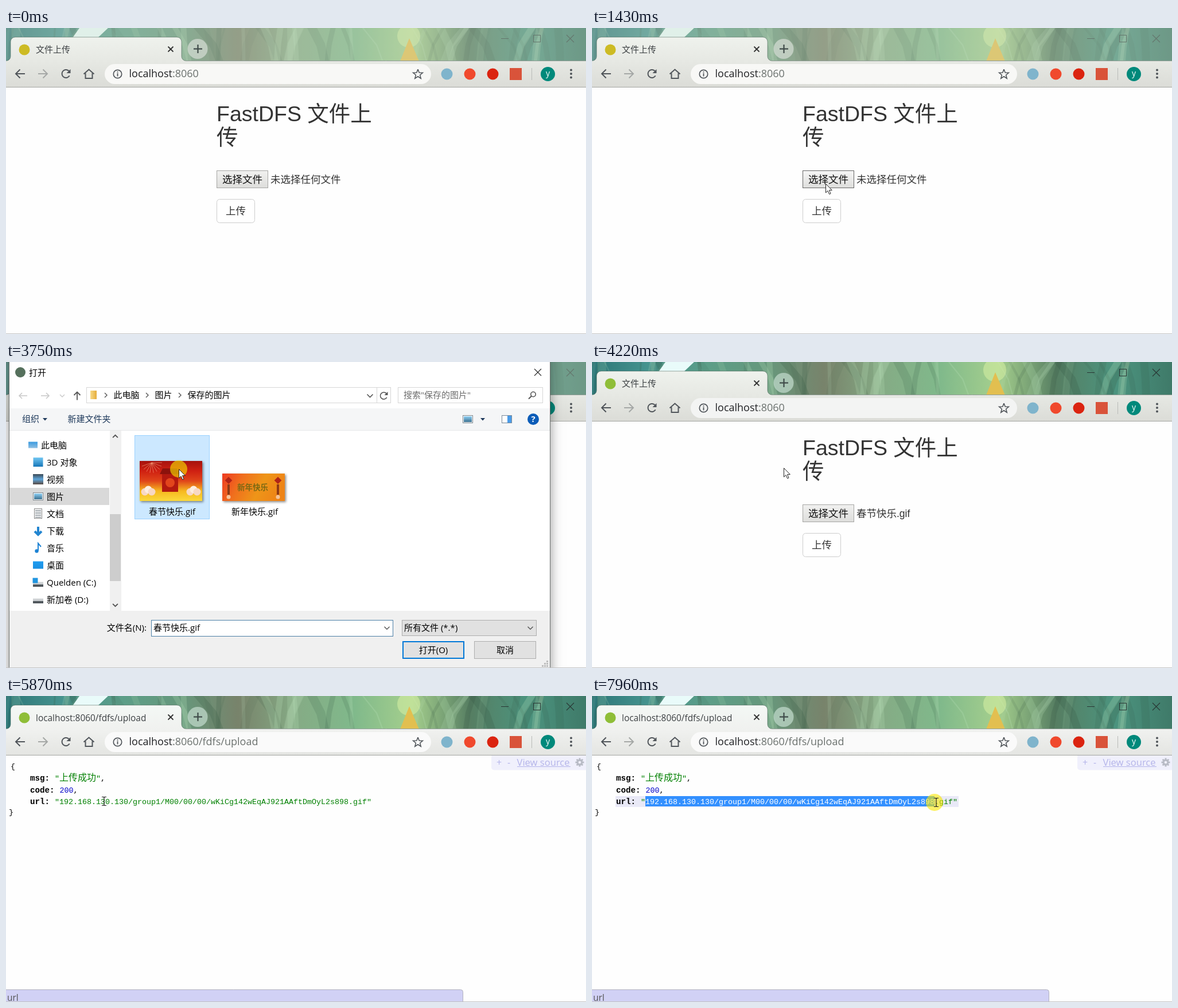
Write an HTML page with a canvas that moves like this. It is 1011 by 535 pixels and loops after 8000 ms.

```html
<!DOCTYPE html>
<html lang="zh-CN">
<head>
<meta charset="utf-8">
<title>文件上传</title>
<style>
html, body { margin: 0; width: 100%; height: 100%; overflow: hidden; background: #fff; }
canvas { display: block; }
</style>
</head>
<body>
<canvas id="stage" width="1011" height="535"></canvas>
<script>
const W = 1011, H = 535, LOOP = 8000, STEP = 75;
const g = document.getElementById('stage').getContext('2d');
const CJK = '"Noto Sans CJK SC", "Noto Sans CJK", sans-serif';
const UI = '"Open Sans", ' + CJK;
const PAGE = '"Liberation Sans", ' + CJK;
const MONO = '"Liberation Mono", "Noto Sans CJK SC", monospace';

// Scene times in ms
const AT = {
  focus: 1030, blur: 1430, open: 2040, shown: 2280, scroll: 2520, list: 2660, full: 2820,
  caret: 3200, pick: 3600, closing: 3830, closed: 3980,
  send: 4930, address: 5080, json: 5240, panel: 5320, hover: 5870, press: 7030, drag: 7180
};
const between = (t, a, b) => t >= a && t < b;

// ---- drawing helpers ----
function text(s, x, cy, size, color = '#000', font = UI, align = 'left', weight = '') {
  g.font = `${weight} ${size}px ${font}`;
  g.textAlign = align;
  g.fillStyle = color;
  g.fillText(s, x, cy + size * 0.36);
  return x + g.measureText(s).width;
}
function rect(x, y, w, h, fill, border, lw = 1) {
  if (fill) { g.fillStyle = fill; g.fillRect(x, y, w, h); }
  if (border) {
    g.strokeStyle = border;
    g.lineWidth = lw;
    g.strokeRect(x + lw / 2, y + lw / 2, w - lw, h - lw);
  }
}
function round(x, y, w, h, r, fill, border) {
  g.beginPath();
  g.roundRect(x, y, w, h, r);
  g.fillStyle = fill;
  g.fill();
  if (border) { g.strokeStyle = border; g.lineWidth = 1; g.stroke(); }
}
function disc(x, y, r, fill) {
  g.beginPath();
  g.arc(x, y, r, 0, Math.PI * 2);
  g.fillStyle = fill;
  g.fill();
}
function ring(x, y, r, color, w, from = 0, to = 7) {
  g.beginPath();
  g.arc(x, y, r, from, to);
  g.strokeStyle = color;
  g.lineWidth = w;
  g.stroke();
}
function trace(p) {
  g.beginPath();
  for (let i = 0; i < p.length; i += 2) g.lineTo(p[i], p[i + 1]);
}
function poly(fill, ...p) { trace(p); g.fillStyle = fill; g.fill(); }
function line(color, w, ...p) { trace(p); g.strokeStyle = color; g.lineWidth = w; g.stroke(); }
function cross(x, y, r, color, w) {
  line(color, w, x - r, y - r, x + r, y + r);
  line(color, w, x + r, y - r, x - r, y + r);
}
function rays(x, y, r, n, from, to, color, w) {
  for (let i = 0; i < n; i++) {
    const a = from + (to - from) * i / n;
    line(color, w, x, y, x + r * Math.cos(a), y + r * Math.sin(a));
  }
}
function turned(x, y, angle, paint) {
  g.save();
  g.translate(x, y);
  g.rotate(angle);
  paint();
  g.restore();
}
// Angle 0 points right
function arrow(x, y, angle, r, head, color, w = 2) {
  turned(x, y, angle, () => {
    line(color, w, -r, 0, r, 0);
    line(color, w, r - head, -head, r, 0, r - head, head);
  });
}
function chevron(x, y, angle, r = 4, color = '#555', w = 1.4) {
  turned(x, y, angle, () => line(color, w, -r / 2, -r, r / 2, 0, -r / 2, r));
}
function reload(x, y, r, color, w) {
  ring(x, y, r, color, w, .5, 5.5);
  poly(color, x + r + 1, y - r - 1, x + r + 1, y - 1, x + 1, y - 1);
}
const DOWN = Math.PI / 2, UP = -DOWN, LEFT = Math.PI;
function triangle(x, y, color) { poly(color, x - 4, y - 2, x + 4, y - 2, x, y + 2.5); }
function fade(x0, y0, x1, y1, ...colors) {
  const f = g.createLinearGradient(x0, y0, x1, y1);
  colors.forEach((c, i) => f.addColorStop(i / (colors.length - 1), c));
  return f;
}
function seeded(s) {
  return () => (s = (s * 16807) % 2147483647) / 2147483647;
}

// ---- cursor ----
// Each move eases on from wherever the last one stopped
const MOVES = [
  { from: 70, to: 800, x: 407, y: 271 },
  { from: 1430, to: 1760, x: 407, y: 274 },
  { from: AT.list, to: 2900, x: 304, y: 190 },
  { from: AT.caret, to: 3380, x: 301, y: 187 },
  { from: 4220, to: 4220, x: 334, y: 185 },
  { from: 4290, to: 4780, x: 413, y: 322 },
  { from: 5550, to: AT.hover, x: 171, y: 184 },
  { from: 5950, to: 6880, x: 97, y: 181 },
  { from: AT.drag, to: 7960, x: 600, y: 186 }
];
function cursorAt(t) {
  if (t < MOVES[0].from) return null;
  const c = { x: 930, y: 545 };
  for (const m of MOVES) {
    if (t < m.from) break;
    const steps = Math.round((m.to - m.from) / STEP) + 1;
    const done = Math.floor((t - m.from) / (m.to - m.from || 1) * (steps - 1)) + 1;
    const p = t >= m.to ? 1 : done / steps;
    const e = 1 - (1 - p) ** 2;
    c.x += (m.x - c.x) * e;
    c.y += (m.y - c.y) * e;
  }
  return c;
}
function clicking(t) {
  return [AT.focus, AT.send].some(a => between(t, a, a + 150)) || between(t, AT.pick, 3900) || t >= AT.press;
}
function drawCursor(c, t) {
  const beam = t >= AT.hover;
  if (clicking(t)) disc(c.x - (beam ? 3 : 0), c.y, 15, 'rgba(250,232,0,.6)');
  g.save();
  g.translate(Math.round(c.x), Math.round(c.y));
  if (beam) {
    line('#222', 1.2, 0, -7, 0, 7);
    for (const s of [-1, 1]) line('#222', 1.2, -4, 7.5 * s, -1, 7.5 * s, 0, 6.5 * s, 1, 7.5 * s, 4, 7.5 * s);
  } else {
    const p = [.5, .5, .5, 16, 4, 12.6, 6.6, 18.6, 9, 17.6, 6.5, 11.6, 11.3, 11.6, .5, .5];
    poly('#fff', ...p);
    line('#222', 1, ...p);
  }
  g.restore();
}

// ---- browser window ----
function wallpaper(active) {
  rect(0, 0, W, 58, fade(0, 0, W, 0,
    '#2c7678', '#46948f', '#5c9e88', '#66987c', '#78836b', '#85ab85', '#80b98b', '#a5cf8d', '#567e62', '#4c947f', '#3f7a69'));
  const rnd = seeded(11);
  for (let i = 0; i < 60; i++) {
    const x = rnd() * W, lean = (rnd() - .5) * 90;
    const tone = rnd() < .5 ? '190,230,190' : '50,85,65';
    line(`rgba(${tone},${.08 + rnd() * .14})`, 2 + rnd() * 14, x, -6, x + lean * .7, 30, x + lean, 64);
  }
  poly('#e9fbfa', 128, 0, 178, 0, 160, 17, 116, 17);
  disc(702, 14, 20, 'rgba(215,240,165,.55)');
  poly('#e2bf50', 703, 18, 720, 58, 687, 58);
  if (!active) rect(0, 0, W, 58, 'rgba(205,215,195,.32)');
}

function tabShape(face) {
  g.beginPath();
  g.moveTo(0, 57.5);
  g.arcTo(8, 57.5, 8, 16, 8);
  g.arcTo(8, 16, 306, 16, 8);
  g.arcTo(306, 16, 306, 57.5, 8);
  g.arcTo(306, 57.5, W, 57.5, 8);
  g.lineTo(W, 57.5);
  g.fillStyle = face;
  g.fill();
  g.strokeStyle = 'rgba(60,85,75,.5)';
  g.lineWidth = 1;
  g.stroke();
}

function chrome(t) {
  const active = between(t, AT.focus, AT.blur) || t >= AT.closed;
  const loaded = t >= AT.address;
  wallpaper(active);
  const face = loaded ? fade(0, 16, 0, 103, '#f4f8f5', '#f0f1ef', '#e4e5e2') : fade(0, 16, 0, 103, '#eff2ed', '#e6e8e3', '#dbdcd7');
  rect(0, 57, W, 47, face);
  tabShape(face);
  rect(0, 103, W, 1, '#a3a5a1');

  disc(32, 38, 9.5, active ? '#8fbe38' : '#cdbb24');
  text(loaded ? 'localhost:8060/fdfs/upload' : '文件上传', 52, 38, loaded ? 15.4 : 15, '#3c4043');
  cross(287, 37, 4.5, '#333', 1.8);
  disc(334, 36.5, 17.5, active ? 'rgba(190,215,200,.75)' : 'rgba(205,215,205,.8)');
  turned(334.5, 36.5, Math.PI / 4, () => cross(0, 0, 5.3, '#3e4a48', 2.2));

  const wc = active ? '#2a3634' : '#64766c';
  rect(863, 18, 13, 1, wc);
  rect(919, 12, 13, 13, null, wc);
  cross(983.5, 18.5, 6.5, wc, 1.1);

  const ic = '#50555a';
  arrow(25, 80, LEFT, 8, 7.5, ic);
  arrow(64, 80, 0, 8, 7.5, '#a5a8a6');
  reload(104.5, 80, 7, ic, 2);
  line(ic, 2, 135.5, 80.5, 144.5, 72.5, 153.5, 80.5);
  line(ic, 2, 138.5, 79, 138.5, 88, 150.5, 88, 150.5, 79);

  round(172, 63, 569, 35, 17.5, loaded ? '#fafafa' : active ? '#f3f4f3' : '#f8f8f6');
  ring(194.5, 80.5, 7.2, ic, 1.7);
  rect(193.6, 79, 1.8, 5.5, ic);
  rect(193.6, 76, 1.8, 1.8, ic);
  const end = text('localhost', 214.5, 80, 18, '#202124');
  text(':8060' + (loaded ? '/fdfs/upload' : ''), end, 80, 18, '#6b716e');
  const star = [];
  for (let i = 0; i <= 10; i++) {
    const r = i % 2 ? 3.8 : 8.8, a = i * Math.PI / 5 - Math.PI / 2;
    star.push(718 + r * Math.cos(a), 81 + r * Math.sin(a));
  }
  line(ic, 1.6, ...star);

  ['#7fb4cc', '#f0492d', '#db2410'].forEach((color, i) => disc(768.5 + i * 40, 80.5, 10, color));
  rect(878, 70, 21, 21, '#d9533a');
  rect(916, 70, 1, 21, '#b9bbb8');
  disc(944.5, 80.5, 12.5, '#00897b');
  text('y', 944.5, 78.5, 14, '#fff', UI, 'center');
  for (let i = -1; i < 2; i++) disc(985, 80 + i * 6.5, 2, ic);
}

// ---- pages ----
function uploadForm(t, c) {
  const over = (x, y, w, h) => c && between(c.x, x, x + w) && between(c.y, y, y + h);
  text('FastDFS 文件上', 367, 149, 37.5, '#333', PAGE);
  text('传', 367, 190, 37.5, '#333', PAGE);
  const pick = over(367, 249, 90, 31), send = over(367, 299, 67, 42);
  rect(367, 249, 90, 31, fade(0, 249, 0, 280, pick ? '#f6f6f6' : '#f1f1f0', '#dddddb'), pick ? '#666' : '#a5a5a3');
  text('选择文件', 377, 264.5, 17.5, '#111', PAGE);
  text(t >= AT.closed ? '春节快乐.gif' : '未选择任何文件', 461, 264.5, 17.5, '#333', PAGE);
  round(367.5, 299.5, 66, 41, 5, send ? '#e6e6e6' : '#fff', send ? '#adadad' : '#ccc');
  text('上传', 383, 319.5, 17.5, '#333', PAGE);
}

function jsonView(t, c) {
  const green = '#008000', size = 13.333, cell = 8;
  const url = '192.168.130.130/group1/M00/00/00/wKiCg142wEqAJ921AAftDmOyL2s898.gif';
  const put = (s, x, y, color = '#000') => text(s, x, y, size, color, MONO);
  if (t > AT.hover + STEP) rect(41, 175, 598, 19, '#e9e9f7');
  put('{', 8, 122);
  put('}', 5, 202);
  ['msg:', 'code:', 'url:'].forEach((k, i) => text(k, 42, 143 + i * 20.5, 14.2, '#000', MONO, 'left', 'bold'));
  const end = text('上传成功', put('"', 85, 143, green), 142, 16, green, CJK);
  put(',', put('"', end, 143, green), 143);
  put(',', put('200', 93.5, 164, '#0000c8'), 164);
  put('"' + url + '"', 85, 184, green);
  if (t >= AT.drag) {
    const n = Math.round((c.x - 3 - 93) / cell);
    rect(93, 175, n * cell, 18, '#3390ff');
    put(url.slice(0, n), 93, 184, '#fff');
  }
  if (t >= AT.panel) viewerBars(t);
}

function viewerBars(t) {
  const pale = '#b4b4ea', grey = '#b9bcc6', back = '#f0f0fc';
  round(846, 104, 172, 25.5, [0, 0, 0, 5], back);
  text('+', 855, 116, 16, pale);
  text('-', 874, 116, 16, pale);
  text('View source', 890.5, 116, 16.6, pale);
  rect(891, 123, 93, 1, pale);
  rays(1000, 116, 7.5, 8, 0, Math.PI * 2, grey, 3);
  disc(1000, 116, 5.5, grey);
  disc(1000, 116, 2.3, back);
  round(-4, 513.5, 800.5, 30, 4, '#d1d1f5', '#b0b0bd');
  if (t >= AT.hover) text('url', 2, 527, 15.5, '#555');
}

// ---- file dialog ----
function thumbs() {
  g.save();
  g.shadowColor = 'rgba(0,0,0,.45)';
  g.shadowBlur = 4;
  g.shadowOffsetX = g.shadowOffsetY = 2;
  rect(233, 173, 109, 70, fade(0, 173, 0, 243, '#a5120e', '#cf2012', '#e0451a', '#f6b81f', '#fbd93c'));
  rect(377, 195, 109, 48, fade(377, 195, 470, 243, '#ee3a22', '#f0701d', '#ee9518', '#ee8417'));
  g.restore();
  rays(254, 176, 18, 9, 0, Math.PI, 'rgba(255,170,130,.6)', 1);
  poly('#8c120c', 268, 196, 273, 186, 298, 186, 304, 196);
  rect(272, 196, 28, 31, '#b3190f');
  disc(286, 211, 8, '#e2451c');
  for (const x of [248, 327]) {
    for (let i = -1; i < 2; i++) disc(x + i * 6, 227 - 4 * (1 - i * i), 6.5, i ? '#f8d8c4' : '#fdeee0');
  }
  text('新年快乐', 430, 219, 13.5, '#7d6913', CJK, 'center', 'bold');
  for (const x of [388, 474]) {
    turned(x, 207, Math.PI / 4, () => rect(-4.5, -4.5, 9, 9, '#b02417'));
    rect(x - 2, 214, 4, 18, '#8e3a16');
    disc(x, 236, 3.5, '#f5c49b');
  }
}

function pageIcon(x, y, lines) {
  rect(x - 7, y - 9, 14, 18, '#fff', '#888');
  for (let i = 0; i < lines; i++) rect(x - 5, y - 6 + i * 3, 10, 1, '#66727b');
}
function picture(x, y) {
  rect(x - 9, y - 7, 18, 14, '#fff', '#7b868e');
  rect(x - 7, y - 5, 14, 10, fade(0, y - 5, 0, y + 5, '#8fd0f5', '#3a6f8e'));
}
const box = (w, h, ...colors) => (x, y) => rect(x - w / 2, y - h / 2, w, h, fade(0, y - h / 2, 0, y + h / 2, ...colors));
function disk(x, y) {
  box(18, 5, '#d4d7d9', '#c4c8cb')(x, y + 1);
  box(18, 4, '#51585d', '#51585d')(x, y + 5);
}
const TREE = [
  ['此电脑', box(16, 11, '#3b9be0', '#8fbfe2')],
  ['3D 对象', box(17, 16, '#74c8f3', '#1576b8')],
  ['视频', box(18, 18, '#3d4a55', '#5da5da', '#5a4a42')],
  ['图片', picture],
  ['文档', (x, y) => pageIcon(x, y, 5)],
  ['下载', (x, y) => arrow(x, y, DOWN, 7, 6, '#2385d0', 4)],
  ['音乐', (x, y) => {
    line('#1d83d4', 2, x, y + 5, x, y - 8, x + 5, y - 2);
    disc(x - 2.5, y + 5.5, 3.2, '#1d83d4');
  }],
  ['桌面', box(18, 13, '#1f9cf0', '#1b90e2')],
  ['Quelden (C:)', (x, y) => { disk(x, y + 1); box(9, 9, '#2196e0', '#2196e0')(x - 5, y - 3); }],
  ['新加卷 (D:)', disk]
];

function navBar() {
  const pale = '#c9c9c9', dark = '#555', navy = '#1e395b', edge = '#d6d6d6';
  arrow(30, 59, LEFT, 7, 5, pale, 1.6);
  arrow(68, 59, 0, 7, 5, pale, 1.6);
  chevron(98, 59, DOWN, 4, pale);
  arrow(124, 59.5, UP, 7, 5.5, dark, 1.8);
  rect(140, 44, 531, 28, '#fff', edge);
  rect(646, 44, 1, 28, edge);
  rect(147, 50, 11, 15, fade(147, 0, 158, 0, '#f8da86', '#e5ad3c'));
  let x = 174;
  for (const name of ['此电脑', '图片', '保存的图片']) {
    chevron(x, 58, 0);
    x = text(name, x + 13.5, 58, 15) + 13.5;
  }
  chevron(634.5, 59, DOWN, 5, dark, 1.6);
  reload(658.5, 59, 6, dark, 1.6);
  rect(683, 44, 253, 28, '#fff', edge);
  text('搜索"保存的图片"', 693, 58, 15, '#6d6d6d');
  ring(919, 56.5, 4.2, dark, 1.6);
  line(dark, 2, 916, 59.5, 911, 64.5);
  text('组织', 28, 100, 15, navy);
  text('新建文件夹', 107.5, 100, 15, navy);
  for (const tx of [68, 831]) triangle(tx, 100, navy);
  picture(805, 100);
}

function footer(t) {
  text('文件名(N):', 245, 465, 15, '#000', UI, 'right');
  rect(253, 451, 422, 29, '#fff', '#4b7fa6');
  if (t >= AT.pick) text('春节快乐.gif', 257, 465, 15);
  else if (t >= AT.caret) rect(257, 456, 1, 19, '#000');
  rect(690, 451, 235, 28, '#e1e1e1', '#adadad');
  text('所有文件 (*.*)', 694, 465, 15);
  for (const x of [664, 914]) chevron(x, 465, DOWN, 4.5);
  rect(691, 488, 108, 31, '#e1e1e1', '#0078d7', 2);
  text('打开(O)', 745, 503.5, 15, '#000', UI, 'center');
  rect(816, 488, 108, 31, '#e1e1e1', '#adadad');
  text('取消', 870, 503.5, 15, '#000', UI, 'center');
  for (let i = 0; i < 3; i++) for (let j = 0; j <= i; j++) rect(942 - j * 4, 522 + i * 4, 3, 3, '#bdbdbd');
}
function emptyFooter() {
  rect(174, 455, 71, 20, '#fff');
  rect(253, 451, 422, 29, '#fff');
  rect(690, 451, 235, 28, '#fff');
  for (const x of [690, 815]) rect(x, 487, 110, 33, '#fff');
  rect(927, 514, 21, 21, '#fff');
}

function fileList(t, full) {
  rect(864, 93, 18, 14, '#fff', '#7a8a99');
  rect(874, 94, 7, 12, '#4a9be8');
  disc(919, 100, 10, '#0b5cb8');
  text('?', 919, 100, 15, '#fff', UI, 'center', 'bold');
  rect(6, 220, 174, 30, '#d9d9d9');
  TREE.forEach(([name, icon], i) => {
    const y = 145 + i * 30;
    if (full) icon(i ? 56 : 47, y);
    else if (i) pageIcon(56, y, 0);
    text(name, i ? 71 : 61, y + .5, 15);
  });
  const picked = t >= AT.pick;
  rect(full ? 224 : 368, 128, 131, 147, picked ? '#cce8ff' : '#e5f3ff', picked && '#99d1ff');
  thumbs();
  ['春节快乐.gif', '新年快乐.gif'].forEach((name, i) => text(name, 289.5 + i * 144, 261.5, 15, '#000', UI, 'center'));
}

function dialog(t) {
  const full = t >= AT.full;
  const grown = (Math.floor((t - AT.open) / 80) + 1) / 4;
  const left = 1 - (Math.floor((t - AT.closing) / STEP) + 1) / 3;
  g.save();
  g.globalAlpha = Math.min(1, grown, t < AT.closing ? 1 : Math.max(0, left));
  g.save();
  g.shadowColor = 'rgba(0,0,0,.45)';
  g.shadowBlur = 20;
  rect(6, -30, 942, 600, '#fff');
  g.restore();
  disc(25, 18, 9, '#55705c');
  text('打开', 40, 18.5, 15);
  cross(927, 18, 6, '#333', 1.2);
  rect(6, 81, 942, 39, '#f5f6f7');
  rect(6, 119, 942, 1, '#e6e7e8');
  rect(6, 435, 942, 100, '#f0f0f0');
  if (t >= AT.scroll) {
    rect(181, 120, 20, 315, '#f0f0f0');
    rect(181, 266, 19, 117, '#cdcdcd');
    chevron(190.5, 130, UP, 4.4, '#505050', 1.8);
    chevron(190.5, 425, DOWN, 4.4, '#505050', 1.8);
  }
  if (t >= AT.list) fileList(t, full);
  if (full) {
    navBar();
    footer(t);
  } else if (t >= AT.shown) emptyFooter();
  for (const x of [5, 948]) rect(x, 0, 1, H, '#6d7270');
  g.restore();
}

function draw(t) {
  const c = cursorAt(t);
  const modal = between(t, AT.open, AT.closed);
  rect(0, 0, W, H, '#fefefe');
  chrome(t);
  if (t < AT.json) uploadForm(t, modal ? null : c);
  else jsonView(t, c);
  if (modal) dialog(t);
  rect(0, H - 1, W, 1, '#c3c3c3');
  if (c) drawCursor(c, t);
}

const start = performance.now();
function tick() {
  draw((performance.now() - start) % LOOP);
  requestAnimationFrame(tick);
}
tick();
</script>
</body>
</html>
```
